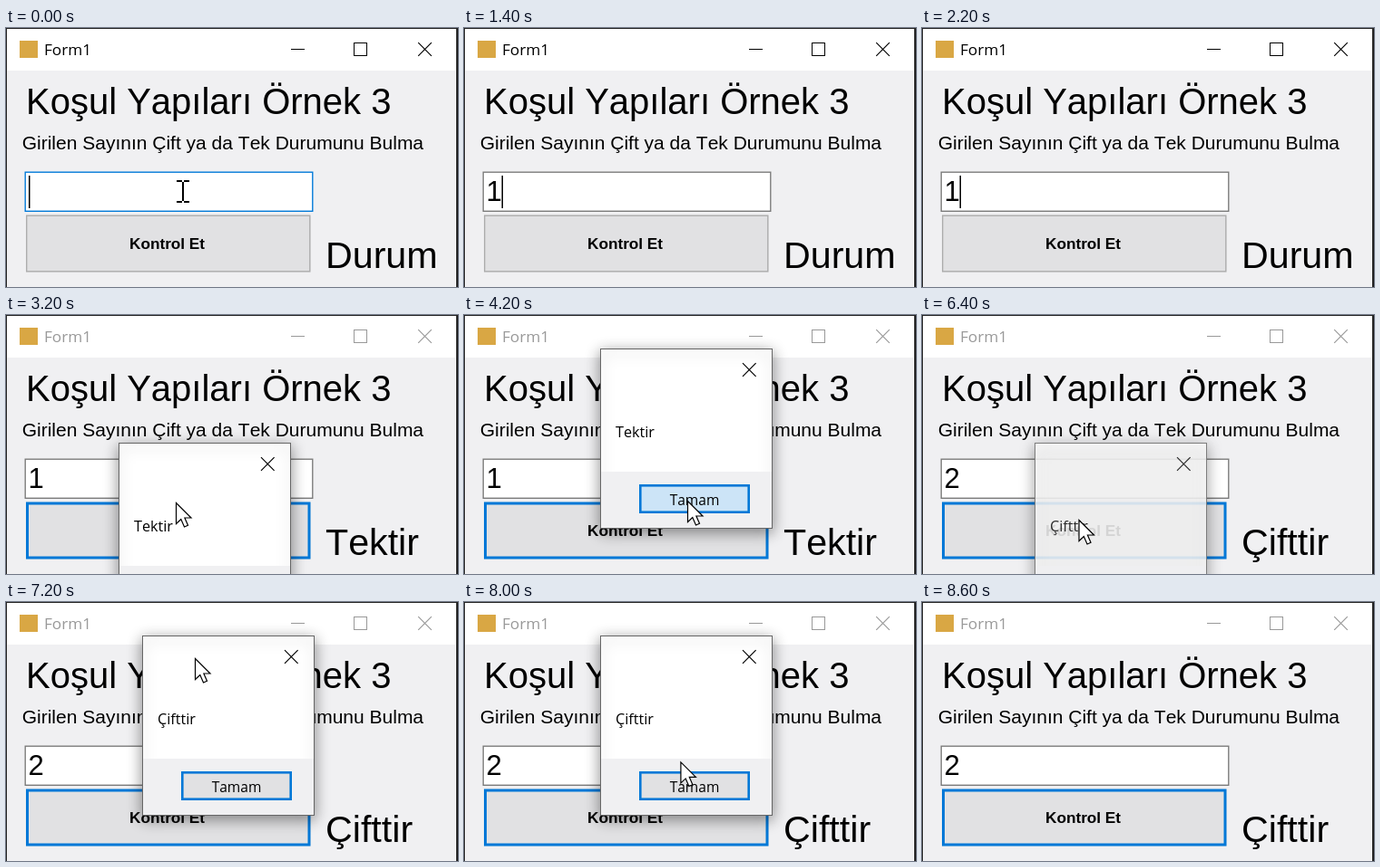
Write an HTML page with a canvas that moves like this. It is 498 px wide and 286 px high and loops after 8.8 s.

```html
<!DOCTYPE html>
<html lang="tr">
<head>
<meta charset="utf-8">
<title>Form1</title>
<style>
html, body { margin: 0; width: 100%; height: 100%; overflow: hidden; background: #f0f0f2; }
canvas { display: block; width: 498px; height: 286px; }
</style>
</head>
<body>
<canvas id="stage"></canvas>
<script>
const W = 498, H = 286, LOOP = 8800, STEP = 200;
const BLUE = '#0078d7', FACE = '#f0f0f2', BUTTON = '#e1e1e3', PRESSED = '#cce4f7';
const ARIAL = '"Liberation Sans", Arial, sans-serif';
const UI = '"Open Sans", "Noto Sans", sans-serif';

// Both rounds share one gesture: type, click, drag the dialog up, confirm.
const ROUNDS = [
  { type: 1200, open: 3000, close: 4400, value: '1', result: 'Tektir' },
  { type: 5800, open: 6400, close: 8600, value: '2', result: 'Çifttir' }
];
const DIALOG = { x: 124, y: 141 }, DROPPED = { x: 150, y: 37 };
const EDIT = { x: 195, y: 180 }, EDIT_AGAIN = { x: 176, y: 187 };
const CLICK = { x: 187, y: 207 }, CLICK_AGAIN = { x: 172.5, y: 226 };
const CONFIRM = { x: 246, y: 205 };

const canvas = document.getElementById('stage');
const ctx = canvas.getContext('2d');
const ratio = window.devicePixelRatio || 1;
canvas.width = W * ratio;
canvas.height = H * ratio;

const within = (t, a, b) => t >= a && t < b;
const clamp = p => Math.min(1, Math.max(0, p));
const inside = (p, x, y, w, h) => within(p.x, x, x + w) && within(p.y, y, y + h);

function glide(a, b, t, from, to) {
  const p = clamp((t - from) / (to - from));
  return { x: a.x + (b.x - a.x) * p, y: a.y + (b.y - a.y) * p };
}

function dialogAt(round, t) {
  return glide(DIALOG, DROPPED, t, round.open + 400, round.open + 800);
}

function pointerAt(round, t) {
  const { open, close } = round;
  const again = round === ROUNDS[1];
  const click = again ? CLICK_AGAIN : CLICK;
  const box = dialogAt(round, t);
  const grip = { x: box.x + 58, y: box.y + 25 };
  if (t < open) return glide(again ? EDIT_AGAIN : EDIT, click, t, open - 600, open - 200);
  if (t < open + 400) return glide(click, grip, t, open + 200, open + 400);
  if (t < close) return glide(grip, CONFIRM, t, open + 800, close - 400);
  return glide(CONFIRM, EDIT_AGAIN, t, close, close + 800);
}

function text(str, x, y, font, color = '#000', align = 'left') {
  ctx.font = font;
  ctx.fillStyle = color;
  ctx.textAlign = align;
  ctx.fillText(str, x, y);
}

function rect(x, y, w, h, color) {
  ctx.fillStyle = color;
  ctx.fillRect(x, y, w, h);
}

function box(x, y, w, h, fill, edge, line = 1) {
  rect(x, y, w, h, fill);
  ctx.strokeStyle = edge;
  ctx.lineWidth = line;
  ctx.strokeRect(x + line / 2, y + line / 2, w - line, h - line);
}

function cross(x, y, color) {
  const r = 7.3;
  ctx.strokeStyle = color;
  ctx.lineWidth = 1.2;
  ctx.beginPath();
  for (const side of [-r, r]) {
    ctx.moveTo(x - side, y - r);
    ctx.lineTo(x + side, y + r);
  }
  ctx.stroke();
}

function drawTitleBar(active) {
  const ink = active ? '#000' : '#999';
  rect(0, 0, W, 47, '#fff');
  rect(15, 14, 20, 19, '#d9a744');
  text('Form1', 42, 30, '17.2px ' + UI, ink);
  rect(314, 23, 15, 1, ink);
  ctx.strokeStyle = ink;
  ctx.lineWidth = 1;
  ctx.strokeRect(383.5, 16.5, 14, 14);
  cross(461.5, 23.5, ink);
}

function drawForm(s) {
  rect(0, 0, W, H, FACE);
  drawTitleBar(s.active);
  text('Koşul Yapıları Örnek 3', 22, 95, '40px ' + ARIAL);
  text('Girilen Sayının Çift ya da Tek Durumunu Bulma', 17.7, 134, '21px ' + ARIAL);
  text(s.label, 352, 265, '41.2px ' + ARIAL);

  box(20.5, 158.5, 318, 44.5, '#fff', s.editBlue ? BLUE : '#7a7a7a', 1.4);
  text(s.value, 24.5, 191, '31px ' + ARIAL);
  if (s.caret) rect(s.value ? 41.5 : 25, 163, 1.5, 36, '#000');

  const fill = s.pressed ? PRESSED : s.hover ? '#e5f1fb' : BUTTON;
  box(22, 206.5, 313.5, 63, fill, s.focus || s.hover ? BLUE : '#adadad', s.focus ? 3 : 1.4);
  text('Kontrol Et', 136, 244, 'bold 17.2px ' + ARIAL);

  rect(0, 0, W, 1, '#222');
  rect(0, 0, 1, H, '#222');
  rect(496, 0, 2, H, '#222');
}

function drawDialog({ x, y }, message, alpha, pressed) {
  ctx.save();
  ctx.globalAlpha = alpha;
  ctx.translate(x, y);
  ctx.save();
  ctx.shadowColor = 'rgba(0,0,0,.42)';
  ctx.shadowBlur = 15 * ratio;
  ctx.shadowOffsetY = 4 * ratio;
  box(0, 0, 190, 199, '#fff', '#666');
  ctx.restore();
  rect(1, 136, 188, 62, FACE);
  cross(164.3, 23.5, '#000');
  text(message, 17, 98, '16.2px ' + UI);
  box(43, 150, 122, 32, pressed ? PRESSED : BUTTON, BLUE, 2.6);
  text('Tamam', 104, 173, '15.5px ' + UI, '#000', 'center');
  ctx.restore();
}

function drawArrow(x, y) {
  ctx.save();
  ctx.translate(x + 0.5, y + 0.5);
  const outline = new Path2D('M0 0V23L5.3 18L9 26.5L13 24.8L9.4 16.5H16.5Z');
  ctx.fillStyle = '#fff';
  ctx.fill(outline);
  ctx.strokeStyle = '#000';
  ctx.lineWidth = 1.2;
  ctx.stroke(outline);
  ctx.restore();
}

function drawBeam(x, y) {
  ctx.save();
  ctx.translate(Math.round(x), Math.round(y));
  rect(-1, -10, 2, 21, '#000');
  for (const end of [-12, 11]) {
    rect(-7, end, 6, 2, '#000');
    rect(1, end, 6, 2, '#000');
  }
  ctx.restore();
}

function render(t) {
  const [first, second] = ROUNDS;
  const round = t < second.type - 400 ? first : second;
  const { type, open, close } = round;
  const again = round === second;
  const answered = t >= open - 200;
  const dialogOpen = within(t, open, close);
  const editing = within(t, again ? type - 400 : 0, open - 200);
  const typed = t >= type;
  const keepsOld = again && t < type - 200;

  const pointer = pointerAt(round, t);
  const typing = within(t, again ? type - 200 : type, open - 600);
  const shown = !typing && t < second.close;
  const onEdit = !dialogOpen && inside(pointer, 20, 158, 319, 45);

  drawForm({
    active: !dialogOpen && t < second.close,
    label: answered ? round.result : again ? first.result : 'Durum',
    value: typed ? round.value : keepsOld ? first.value : '',
    editBlue: editing && !typed,
    caret: editing && Math.floor(t / 530) % 2 === 0,
    focus: !editing,
    hover: shown && !dialogOpen && inside(pointer, 22, 206, 313, 63),
    pressed: within(t, open - 200, open)
  });
  if (dialogOpen) {
    const alpha = t < open + STEP ? 0.83 : 1;
    drawDialog(dialogAt(round, t), round.result, alpha, t >= close - STEP);
  }
  if (shown) (onEdit ? drawBeam : drawArrow)(pointer.x, pointer.y);
}

const start = performance.now();
function tick() {
  const t = (performance.now() - start) % LOOP;
  ctx.setTransform(ratio, 0, 0, ratio, 0, 0);
  ctx.fontKerning = 'none';
  render(Math.floor(t / STEP) * STEP);
  requestAnimationFrame(tick);
}
tick();
</script>
</body>
</html>
```
